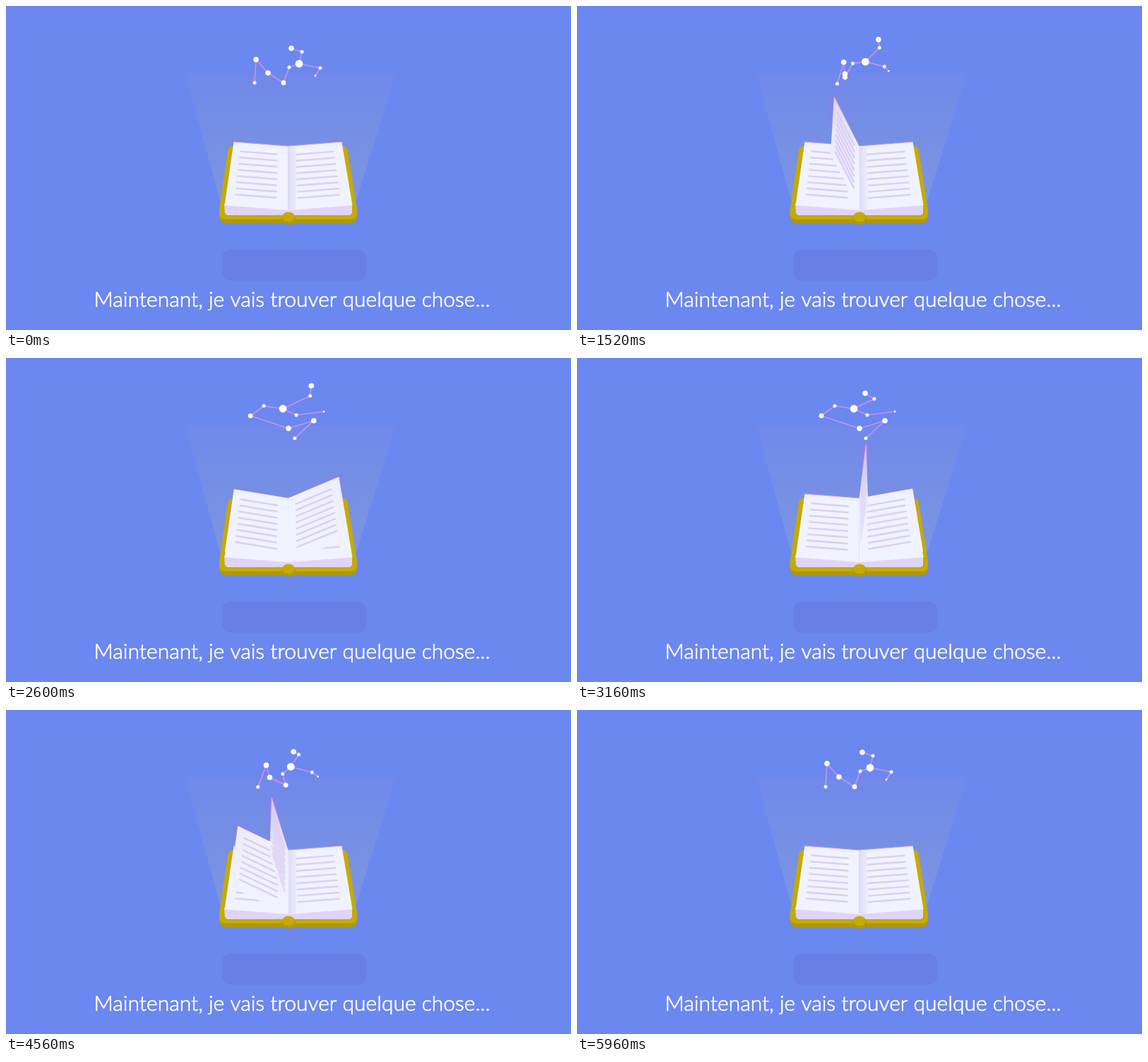
An HTML page with a canvas that plays this animation: 800 by 460 pixels, repeating every 6 s.

```html
<!DOCTYPE html>
<html lang="fr">
<head>
<meta charset="utf-8">
<style>
html, body { margin: 0; width: 100%; height: 100%; overflow: hidden; background: #6b87f0; }
canvas { display: block; }
</style>
</head>
<body>
<canvas id="stage" width="800" height="460"></canvas>
<script>
const ctx = document.getElementById('stage').getContext('2d');
const LOOP = 6000, GOLD = '#c4aa06', DARK_GOLD = '#b0970a';

// Each star has a radius and its place in three constellations; wag is its share of the tip's swing.
const STARS = [
  { r: 2.5, poses: [[352, 109], [409, 114], [378, 111]] },
  { r: 3.8, poses: [[354, 76], [436, 89], [433, 89]] },
  { r: 3.8, poses: [[371, 95], [400, 100], [384, 99]] },
  { r: 3.4, poses: [[393, 109], [346, 82], [410, 96]] },
  { r: 2.5, poses: [[401, 87], [365, 68], [351, 107]] },
  { r: 5.4, poses: [[415, 82], [392, 72], [351, 74]] },
  { r: 2.5, poses: [[419, 65], [421, 58], [395, 56]], wag: .4 },
  { r: 3.8, poses: [[404, 60], [408, 50], [421, 56]], wag: 1 },
  { r: 2.5, poses: [[445, 88], [411, 81], [382, 91]] },
  { r: 1.4, poses: [[438, 99], [450, 76], [458, 75]] }
];
const LINKS = [[0, 1, 2, 3, 4, 5, 6, 7], [5, 8, 9]];

// Start and duration of each turning page, in ms.
const TURNS = [[270, 2080], [1530, 1190], [2180, 2080], [2940, 2080], [3140, 1200], [3500, 1880]];

const progress = (t, from, to) => Math.min(1, Math.max(0, (t - from) / (to - from)));
const smooth = s => s * s * (3 - 2 * s);
const easeOut = s => 1 - (1 - s) ** 4.6;
const mix = (p, q, k) => [p[0] + (q[0] - p[0]) * k, p[1] + (q[1] - p[1]) * k];

function trace(points, close) {
  ctx.beginPath();
  points.forEach(p => ctx.lineTo(...p));
  if (close) ctx.closePath();
}

function fillPoly(points, color) {
  trace(points, true);
  ctx.fillStyle = color;
  ctx.fill();
}

function strokeLine(points, color, width) {
  trace(points);
  ctx.strokeStyle = color;
  ctx.lineWidth = width;
  ctx.stroke();
}

function ellipse(x, y, rx, ry, color) {
  ctx.beginPath();
  ctx.ellipse(x, y, rx, ry, 0, 0, 7);
  ctx.fillStyle = color;
  ctx.fill();
}

function gradient(x0, y0, x1, y1, ...colors) {
  const g = ctx.createLinearGradient(x0, y0, x1, y1);
  colors.forEach((c, i) => g.addColorStop(i / (colors.length - 1), c));
  return g;
}

// The angle runs from 0 (flat on the right) to PI (flat on the left).
function drawPage(angle) {
  const c = Math.cos(angle), s = Math.sin(angle), open = Math.min(1, 2.5 * Math.abs(c));
  const top = [399.5, 199], bottom = [400, 290];
  const outerTop = [399 + 76.5 * c, 198.5 - 76 * s - 5.5 * c * c];
  const outerBottom = [400 + 90.5 * c, 290 - 88 * s - 7 * c * c];
  const at = (u, v) => mix(mix(top, outerTop, u), mix(bottom, outerBottom, u), v);
  const corners = [top, outerTop, outerBottom, bottom];

  if (s > .02) {
    const end = at(1, .6);
    ctx.save();
    ctx.shadowColor = '#bd62e4';
    ctx.shadowBlur = 3 + 9 * s;
    strokeLine([top, outerTop, end],
      gradient(0, outerTop[1], 0, end[1] + 1, '#c488e4', 'rgba(200,160,240,0)'), .6 + 1.4 * s);
    ctx.restore();
  }
  fillPoly(corners, gradient(0, outerTop[1], 0, 205, `rgba(240,240,255,${.25 + .75 * open})`, '#f0f3ff'));
  fillPoly(corners, gradient(...outerTop, 400, 245,
    `rgba(207,180,218,${.65 * s * s})`, 'rgba(235,230,250,0)'));
  if (s < .02) strokeLine([top, outerTop], '#d3a8ee', 1);

  const [near, far] = c < 0 ? [.2, .85] : [.15, .82];
  ctx.globalAlpha = open;
  for (let i = 0; i < 8; i++) {
    const v = .14 + .097 * i;
    strokeLine([at(near, v), at(far, v)], '#dccff6', 2.6);
  }
  ctx.globalAlpha = 1;
}

function drawCover() {
  for (const [y, color] of [[308, DARK_GOLD], [303, GOLD]]) {
    ctx.fillStyle = color;
    ctx.fill(new Path2D(`M321 199 Q315 199 314 206 L302 ${y - 15} Q300 ${y} 310 ${y}
      H489 Q499 ${y} 497 ${y - 15} L484 206 Q483 199 477 199 Z`));
  }
}

function drawBook(t) {
  drawCover();
  fillPoly([[309, 281], [400, 288], [490, 281], [490, 294], [487, 297], [313, 297], [310, 294]], '#e0d4f7');
  drawPage(Math.PI);
  drawPage(0);
  ctx.fillStyle = gradient(398, 0, 412, 0, '#dcd7f3', 'rgba(226,223,247,.3)');
  ctx.fillRect(399, 200, 12, 89);
  TURNS.map(([start, length]) => Math.PI * smooth(progress(t, start, start + length)))
    .filter(angle => Math.sin(angle) > .01)
    .sort((a, b) => Math.sin(a) - Math.sin(b))
    .forEach(drawPage);
  ellipse(400, 302, 10, 8.5, DARK_GOLD);
  ellipse(400, 299.5, 9, 7, GOLD);
}

function drawStars(t) {
  const morphs = [
    smooth(progress(t, 900, 2650)),
    smooth(progress(t, 3160, 3920)),
    easeOut(progress(t, 3920, LOOP))
  ];
  const swing = Math.sin(Math.PI * progress(t, 1000, 3160)) ** 2;
  const spots = STARS.map(({ poses, wag = 0 }) => {
    const [x, y] = morphs.reduce((p, k, i) => mix(p, poses[(i + 1) % 3], k), poses[0]);
    return [x + 46 * wag * swing, y - 20 * wag * swing];
  });
  LINKS.forEach(link => strokeLine(link.map(i => spots[i]), '#c990ea', 1.7));
  spots.forEach(([x, y], i) => ellipse(x, y, STARS[i].r, STARS[i].r, '#fff'));
}

function drawCaption() {
  const text = 'Maintenant, je vais trouver quelque chose...';
  ctx.font = '300 30px Lato, "Open Sans", sans-serif';
  ctx.textAlign = 'center';
  ctx.fillStyle = ctx.strokeStyle = '#fff';
  ctx.lineWidth = .7;
  ctx.fillText(text, 405, 427);
  ctx.strokeText(text, 405, 427);
}

function draw(t) {
  ctx.fillStyle = '#6b87f0';
  ctx.fillRect(0, 0, 800, 460);
  fillPoly([[254, 96], [552, 96], [496, 276], [303, 276]],
    gradient(0, 96, 0, 276, '#7089eb', '#768fe4', '#7c95e2'));
  ctx.beginPath();
  ctx.roundRect(306, 346, 204, 44, 12);
  ctx.fillStyle = '#697ee8';
  ctx.fill();
  ctx.lineCap = ctx.lineJoin = 'round';
  drawBook(t);
  drawStars(t);
  drawCaption();
}

function frame() {
  draw(performance.now() % LOOP);
  requestAnimationFrame(frame);
}
frame();
</script>
</body>
</html>
```
